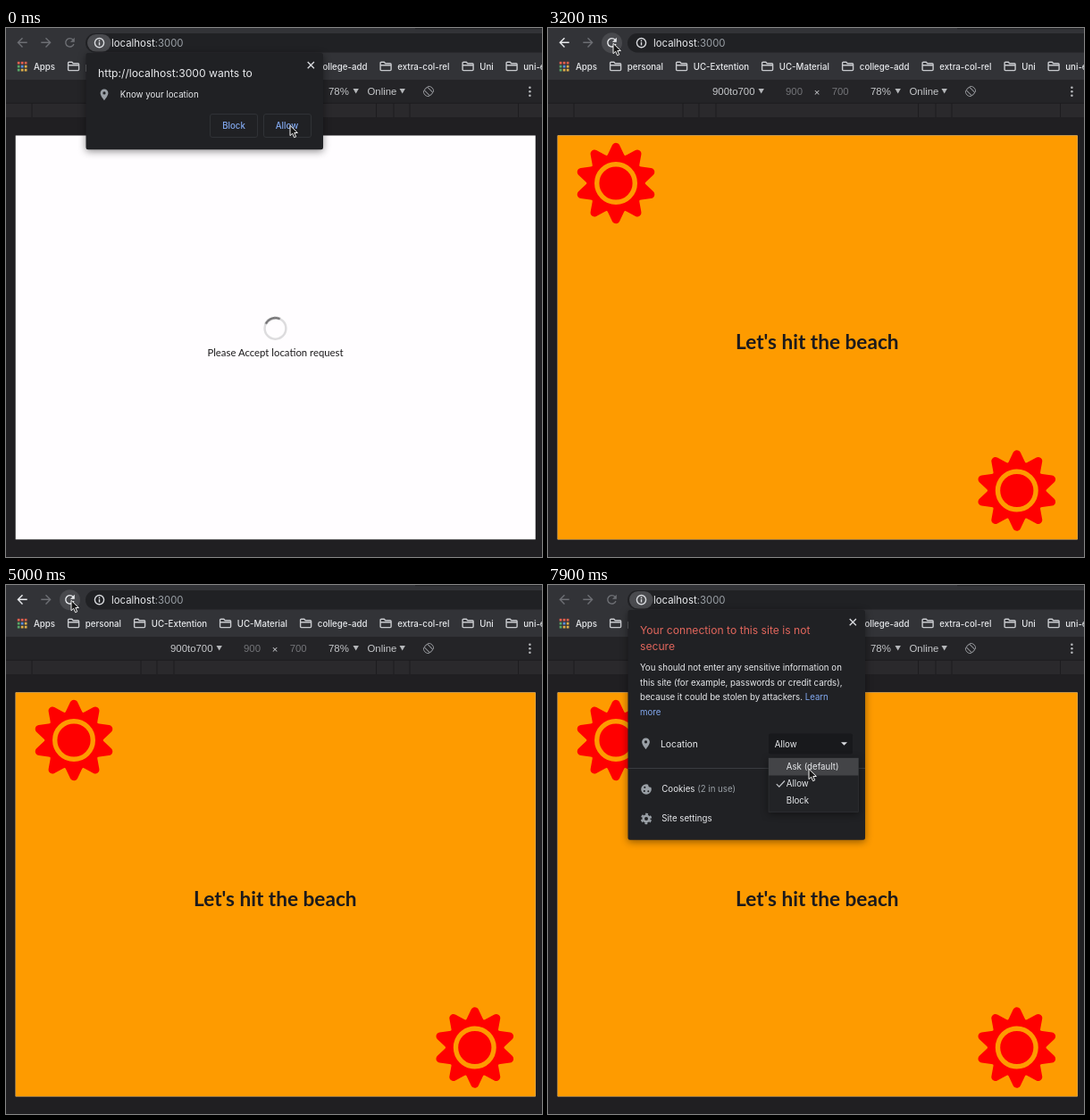
Recreate the animation shown at these times as an HTML page. Size 600x593 px, loop 8 s.

```html
<!DOCTYPE html>
<html lang="en">
<head>
<meta charset="utf-8">
<title>Weather page</title>
<style>
html, body { margin: 0; width: 100%; height: 100%; overflow: hidden; background: #201f22; }
svg { display: block; width: 100vw; height: 100vh; }
text { font-family: Inter, Roboto, sans-serif; font-size: 9.7px; fill: #e8eaed; white-space: pre; }
.marks text { font-weight: 500; }
.device text { font: 11.4px "Liberation Sans", Arial, sans-serif; fill: #c6c8cb; }
.device .off { fill: #737478; }
.page text { font-family: Lato, sans-serif; text-anchor: middle; fill: #1c1a1c; }
.title { font-size: 12.15px; }
.row { font-size: 10.3px; }
.blue { fill: #82a9f0; }
.mid { text-anchor: middle; font-weight: 500; }
.grey { fill: #9aa0a6; }
.line { fill: none; stroke: currentColor; stroke-width: 1.4; }
.bubble { filter: drop-shadow(0 2px 4px rgba(0,0,0,.45)); }

/* every animation shares one 8 s clock */
.t { animation: 8s linear infinite; }
.step { animation-timing-function: step-end; }
.nav { animation-name: nav; }
.ask { animation-name: ask; }
.wait { animation-name: wait; }
.beach { animation-name: beach; }
.pill { animation-name: pill; }
.hover { animation-name: hover; }
.reload { animation-name: reload; }
.stop { animation-name: stop; }
.info { animation-name: info; }
.menu { animation-name: menu; }
.pick { animation-name: pick; }
.spin { animation-name: spin; transform-origin: 301.5px 336.8px; }
.cursor { animation-name: cursor; animation-timing-function: ease-in-out; }

@keyframes nav { 0%, 80%, 100% { color: #6d6f74; } 1.25% { color: #e8eaed; } }
@keyframes ask { 0%, 1% { opacity: 1; } 2.5%, 100% { opacity: 0; } }
@keyframes wait { 0% { opacity: 1; } 3.7%, 100% { opacity: 0; } }
@keyframes beach { 0%, 41.2% { opacity: 0; } 3.7%, 44.95%, 100% { opacity: 1; } }
@keyframes pill { 0%, 77.5%, 100% { opacity: 1; } 1.25% { opacity: 0; } }
@keyframes hover { 0%, 72.4% { opacity: 0; } 30%, 100% { opacity: 1; } 72.4%, 100% { opacity: 0; } }
@keyframes reload { 0%, 48.7%, 100% { opacity: 1; } 44.95% { opacity: 0; } }
@keyframes stop { 0%, 48.7%, 100% { opacity: 0; } 44.95% { opacity: 1; } }
@keyframes info { 0%, 79.9% { opacity: 0; } 82%, 100% { opacity: 1; } }
@keyframes menu { 0% { opacity: 0; } 92.45%, 100% { opacity: 1; } }
@keyframes pick { 0% { transform: translateY(19px); } 96.2%, 100% { transform: none; } }
@keyframes spin { from { transform: rotate(-20deg); } to { transform: rotate(4780deg); } }
@keyframes cursor {
  0%, 21% { transform: translate(318px, 109px); }
  26.25% { transform: translate(55px, 39px); }
  31.25%, 71.25% { transform: translate(73px, 17px); }
  77.5%, 81.25% { transform: translate(109px, 15px); }
  90%, 92.5% { transform: translate(301px, 178px); }
  97.5%, 100% { transform: translate(292px, 206px); }
}
</style>
</head>
<body>
<svg viewBox="0 0 600 593" preserveAspectRatio="none">
  <defs>
    <path id="folder" class="line" stroke-width="1.1" d="M.6 1.6Q.6.6 1.6.6H4.8L6.2 2.2H11.6Q12.6 2.2 12.6 3.2V9Q12.6 10 11.6 10H1.6Q.6 10 .6 9ZM.6 4.2H12.6"/>
    <path id="down" fill="#b5b7ba" d="M0 0H6.4L3.2 5.6Z"/>
    <path id="pin" fill="#9aa0a6" fill-rule="evenodd" d="M0-6.3A4.4 4.4 0 0 1 4.4-1.9C4.4 1.2 0 6.2 0 6.2S-4.4 1.2-4.4-1.9A4.4 4.4 0 0 1 0-6.3M0-3.5A1.6 1.6 0 1 0 0-.3A1.6 1.6 0 1 0 0-3.5"/>
    <path id="close" stroke="#dadce0" stroke-width="1.3" d="M-3.6-3.6L3.6 3.6M3.6-3.6L-3.6 3.6"/>
    <g id="sun">
      <path id="rays" fill="red" stroke="red" stroke-width="9" stroke-linejoin="round"/>
      <circle r="21.3" fill="none" stroke="#fe9b00" stroke-width="5.4"/>
    </g>
  </defs>

  <rect width="600" height="593" fill="#201f22"/>
  <rect width="600" height="58" fill="#323337"/>
  <rect x="458" width="142" height="1.2" fill="#232427"/>
  <rect x="89" y="6" width="540" height="21.5" rx="10.7" fill="#202124"/>

  <circle class="t step hover" cx="71.5" cy="16.7" r="11.5" fill="#48494d"/>
  <g class="t step nav" stroke-linecap="square">
    <path class="line" d="M23 16.3H13.8M18 11.7L13.4 16.3L18 20.9"/>
    <path class="line" color="#6d6f74" d="M40 16.3H49.2M45 11.7L49.6 16.3L45 20.9"/>
    <g class="t step reload">
      <path class="line" stroke-linecap="butt" d="M74.9 13.1A4.7 4.7 0 1 0 75.9 18"/>
      <path fill="currentColor" d="M76.8 10.8V15.7H71.9Z"/>
    </g>
    <path class="line t step stop" d="M67.2 12.2L75.6 20.6M75.6 12.2L67.2 20.6"/>
  </g>

  <rect class="t step pill" x="91" y="7" width="26.5" height="19.5" rx="9.7" fill="#4a4b4f"/>
  <g color="#dadce0">
    <circle class="line" cx="104.5" cy="16.6" r="5.1" stroke-width="1.1"/>
    <path class="line" d="M104.5 15.8V19.4M104.5 13.6V14.9"/>
  </g>
  <text x="118" y="20.5" font-size="11.4" style="font-size:11.4px">localhost<tspan class="grey">:3000</tspan></text>

  <g class="marks" id="marks" color="#c8cace">
    <g id="apps"></g>
    <text x="31" y="46.6">Apps</text>
  </g>

  <rect y="58" width="600" height="26" fill="#242427"/>
  <rect y="84" width="600" height="16" fill="#2a292c"/>
  <path stroke="#1d1c1f" d="M0 84.3H600M29 84V100M151 84V100M169 84V100M188 84V100M414.500 84V100M434 84V100M452 84V100M573.500 84V100"/>
  <g class="device">
    <text x="184" y="75">900to700</text>
    <text class="off" x="266" y="75">900</text>
    <text x="297.700" y="75.600">×</text>
    <text class="off" x="317.700" y="75">700</text>
    <text x="361" y="75">78%</text>
    <text x="404.500" y="75">Online</text>
    <use href="#down" x="235.500" y="68"/>
    <use href="#down" x="388.500" y="68"/>
    <use href="#down" x="440.500" y="68"/>
    <g color="#909296" transform="translate(473 71)">
      <rect class="line" x="-2.500" y="-4.500" width="5" height="9" rx=".8" style="stroke-width:1" transform="rotate(-45)"/>
      <path class="line" style="stroke-width:1" d="M-.8-5.600A5.600 5.600 0 0 1 5.600.8M.8 5.600A5.600 5.600 0 0 1-5.600-.8"/>
    </g>
    <g fill="#b5b7ba">
      <circle cx="586.400" cy="66.700" r="1.300"/><circle cx="586.400" cy="71.200" r="1.300"/><circle cx="586.400" cy="75.700" r="1.300"/>
    </g>
  </g>

  <g class="page">
    <rect x="10.700" y="120.500" width="582" height="452.800" fill="#fffdff"/>
    <g class="t step wait">
      <circle cx="301.500" cy="336.800" r="11.900" fill="none" stroke="#dddcde" stroke-width="2.500"/>
      <path class="t spin" d="M293.100 328.400A11.900 11.900 0 0 1 309.900 328.400" fill="none" stroke="#737274" stroke-width="2.500"/>
      <text x="301.500" y="368" style="font-size:11.350px">Please Accept location request</text>
    </g>
    <g class="t step beach">
      <rect x="10.700" y="120.500" width="582" height="452.800" fill="#fe9b00"/>
      <use href="#sun" x="76" y="174"/>
      <use href="#sun" x="524.800" y="518.500"/>
      <text x="301.300" y="359.500" style="font-size:22.600px;font-weight:700">Let's hit the beach</text>
    </g>
  </g>

  <g class="t ask">
    <rect class="bubble" x="89.500" y="28" width="265.500" height="108.300" rx="2.500" fill="#202124"/>
    <text class="title" x="103" y="54.500">http://localhost:3000 wants to</text>
    <use href="#close" x="341.300" y="41.600"/>
    <use href="#pin" x="110" y="74.800"/>
    <text x="127.700" y="78">Know your location</text>
    <g fill="none" stroke="#303236">
      <rect x="228.500" y="96.500" width="53" height="26" rx="2.500"/>
      <rect x="288.500" y="96.500" width="53" height="26" rx="2.500"/>
    </g>
    <text class="blue mid" x="255" y="113">Block</text>
    <text class="blue mid" x="314.500" y="113">Allow</text>
  </g>

  <g class="t info">
    <rect class="bubble" x="89.500" y="28" width="265.500" height="257.800" rx="2.500" fill="#202124"/>
    <text class="title" style="fill:#e0665c"><tspan x="103" y="54.500">Your connection to this site is not</tspan><tspan x="103" y="72.700">secure</tspan></text>
    <use href="#close" x="341.300" y="41.600"/>
    <text><tspan x="103" y="96.300">You should not enter any sensitive information on</tspan><tspan x="103" y="112.800">this site (for example, passwords or credit cards),</tspan><tspan x="103" y="129.300">because it could be stolen by attackers. <tspan class="blue">Learn</tspan></tspan><tspan class="blue" x="103" y="145.800">more</tspan></text>
    <use href="#pin" x="109.500" y="177.800"/>
    <text class="row" x="126" y="181.500">Location</text>
    <rect x="247" y="166.500" width="94" height="23" rx="2" fill="#18191c"/>
    <text x="253.700" y="181.500">Allow</text>
    <path fill="#dadce0" d="M328 176.300H335L331.500 179.800Z"/>
    <path stroke="#3a3c40" d="M89.500 205.500H355"/>
    <circle cx="110" cy="229" r="5.800" fill="#9aa0a6"/>
    <g fill="#202124">
      <circle cx="114.800" cy="224.300" r="2.500"/><circle cx="108.300" cy="226.800" r="1.100"/>
      <circle cx="107.800" cy="231" r="1.100"/><circle cx="112.300" cy="231.300" r="1"/>
    </g>
    <text x="127.300" y="232.400">Cookies <tspan class="grey">(2 in use)</tspan></text>
    <g fill="none" stroke="#9aa0a6" transform="translate(110 262)">
      <circle r="3.300" stroke-width="2.600"/>
      <circle r="5.200" stroke-width="2" stroke-dasharray="2.800 2.645" transform="rotate(14)"/>
    </g>
    <text x="127.300" y="265.400">Site settings</text>
  </g>

  <g class="t step menu">
    <rect class="bubble" x="247" y="194" width="100.500" height="60.500" fill="#222326" stroke="#34363a" stroke-width=".6"/>
    <rect class="t step pick" x="247" y="194" width="100.500" height="19.500" fill="#434447"/>
    <path class="line" color="#c4c7cb" style="stroke-width:1.200" d="M255.800 223.200L258.800 226.200L265 219.500"/>
    <text x="266.800" y="207.300">Ask (default)</text>
    <text x="266.800" y="226.400">Allow</text>
    <text x="266.800" y="245.400">Block</text>
  </g>

  <path class="t cursor" fill="#161616" stroke="#f4f4f4" stroke-linejoin="round" d="M0 .3V11.700L2.700 9.200L4.600 13.700L6.700 12.800L4.800 8.500H8.400Z"/>
</svg>
<script>
const byId = id => document.getElementById(id);
const add = (parent, tag, attrs, text = '') => {
  const el = document.createElementNS('http://www.w3.org/2000/svg', tag);
  for (const key in attrs) el.setAttribute(key, attrs[key]);
  el.textContent = text;
  parent.append(el);
};

// folder x, label
[[69, 'personal'], [143, 'UC-Extention'], [239, 'UC-Material'], [329, 'college-add'],
 [418.5, 'extra-col-rel'], [510.5, 'Uni'], [559.5, 'uni-extra']].forEach(([x, label]) => {
  add(byId('marks'), 'use', { href: '#folder', x, y: 37.6 });
  add(byId('marks'), 'text', { x: x + 19.8, y: 46.6 }, label);
});

const dots = ['#e8604f', '#e8604f', '#d9604a', '#58a868', '#5b8fe0', '#e0b04a', '#58a868', '#e0b04a', '#e0b04a'];
dots.forEach((fill, i) => add(byId('apps'), 'rect', {
  x: 12.8 + i % 3 * 4, y: 37.8 + Math.floor(i / 3) * 4, width: 2.7, height: 2.7, fill
}));

// ten-pointed sun with rounded valleys
const polar = (r, step) => {
  const a = step * Math.PI / 10;
  return [r * Math.sin(a), -r * Math.cos(a)];
};
const mix = (p, q, k) => p.map((v, i) => v + (q[i] - v) * k);
let d = '';
for (let i = 0; i < 20; i += 2) {
  const tip = polar(40.8, i), valley = polar(25.5, i + 1), next = polar(40.8, i + 2);
  d += `${i ? 'L' : 'M'}${tip}L${mix(tip, valley, .6)}Q${valley} ${mix(next, valley, .6)}`;
}
byId('rays').setAttribute('d', d + 'Z');
</script>
</body>
</html>
```
